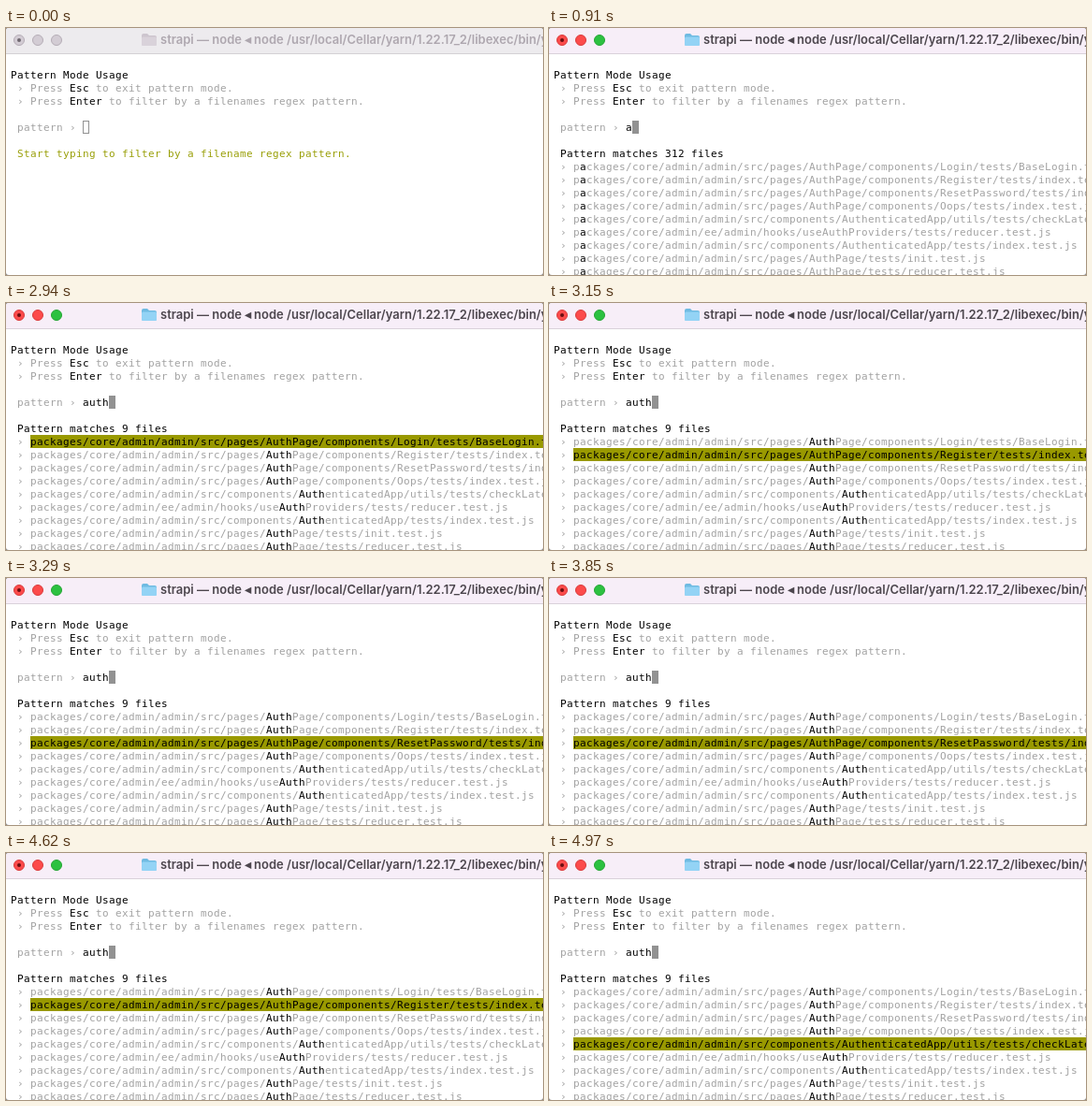
These frames come from a looping animation (574 by 264 pixels, 5530 ms). An HTML page:

```html
<!DOCTYPE html>
<html lang="en">
<head>
<meta charset="utf-8">
<title>Pattern mode</title>
<style>
  html, body { margin: 0; width: 100%; height: 100%; overflow: hidden; background: #fff; }
  svg { display: block; }
  text { white-space: pre; }
  .mono { font: 11px "DejaVu Sans Mono", monospace; }
  .title { font: 600 13px Inter, sans-serif; }
</style>
</head>
<body>
<svg id="stage" width="574" height="264" viewBox="0 0 574 264"></svg>
<script>
const LOOP = 5530, CELL = 7, LINE = 14, LEFT = 5, BASE = 54;
const INK = '#000', DIM = '#a2a2a2', OLIVE = '#999f08';
const PAGES = 'packages/core/admin/admin/src/pages/AuthPage/';
const PARTS = 'packages/core/admin/admin/src/components/AuthenticatedApp/';
const FILES = [
  PAGES + 'components/Login/tests/BaseLogin.test.js',
  PAGES + 'components/Register/tests/index.test.js',
  PAGES + 'components/ResetPassword/tests/index.test.js',
  PAGES + 'components/Oops/tests/index.test.js',
  PARTS + 'utils/tests/checkLatestStrapiVersion.test.js',
  'packages/core/admin/ee/admin/hooks/useAuthProviders/tests/reducer.test.js',
  PARTS + 'tests/index.test.js',
  PAGES + 'tests/init.test.js',
  PAGES + 'tests/reducer.test.js'
];

// [start time, value]
const TYPED = [[0, ''], [910, 'a'], [1190, 'au'], [1260, 'aut'], [1470, 'auth']];
const PICKED = [
  [0, -1], [2940, 0], [3080, 1], [3220, 2], [3360, 3],
  [3640, 2], [3920, 1], [4060, 0], [4200, -1],
  [4410, 0], [4550, 1], [4690, 2], [4830, 3], [4970, 4]
];
const FOCUS = 490;

const stage = document.getElementById('stage');
const at = (track, t) => track.filter(([start]) => start <= t).pop()[1];

function add(parent, tag, attrs, text) {
  const el = document.createElementNS('http://www.w3.org/2000/svg', tag);
  for (const key in attrs) el.setAttribute(key, attrs[key]);
  if (text) el.textContent = text;
  return parent.appendChild(el);
}

// Places text on the terminal's character grid.
function put(parent, row, col, text, fill, extra) {
  const x = [...text].map((_, i) => LEFT + (col + i) * CELL).join(' ');
  add(parent, 'text', { class: 'mono', x, y: BASE + row * LINE, fill, ...extra }, text);
}

function drawBar(g, active) {
  add(g, 'rect', { width: 574, height: 27, fill: active ? '#f7eef8' : '#edebee' });
  add(g, 'rect', { y: 27, width: 574, height: 1, fill: active ? '#d9d1da' : '#d4d1d5' });
  const lights = active
    ? [['#fc4b4b', '#d93a3c'], ['#fc4b4b', '#d93a3c'], ['#2cc140', '#24a534']]
    : Array(3).fill(['#d3ccd4', '#b5adb6']);
  lights.forEach(([fill, stroke], i) =>
    add(g, 'circle', { cx: 14 + 20 * i, cy: 13, r: 5.5, fill, stroke }));
  add(g, 'circle', { cx: 14, cy: 13, r: 2, fill: active ? '#6b0d10' : '#6f6870' });

  const [back, front] = active ? ['#6fbbe2', '#93d3f5'] : ['#cdc5ce', '#d9d2da'];
  add(g, 'path', { d: 'M145 8q0-2 2-2h4l2 2h6q2 0 2 2v7q0 2-2 2h-12q-2 0-2-2z', fill: back });
  add(g, 'rect', { x: 145, y: 9.5, width: 16, height: 9.5, rx: 1.5, fill: front });
  add(g, 'text', { class: 'title', x: 165, y: 17, fill: active ? '#4c464d' : '#aea7af' },
    'strapi — node ◂ node /usr/local/Cellar/yarn/1.22.17_2/libexec/bin/yarn.js');
}

function drawFile(g, file, i, typed, picked) {
  const row = 7 + i;
  put(g, row, 1, '›', DIM);
  if (picked) {
    add(g, 'rect', { x: 26, y: 141 + i * LINE, width: 548, height: LINE, fill: '#999900' });
    put(g, row, 3, file, INK);
    return;
  }
  const from = file.toLowerCase().indexOf(typed), to = from + typed.length;
  put(g, row, 3, file.slice(0, from), DIM);
  put(g, row, 3 + from, file.slice(from, to), INK);
  put(g, row, 3 + to, file.slice(to), DIM);
}

function draw(active, typed, picked) {
  stage.replaceChildren();
  add(stage, 'rect', { width: 574, height: 264, fill: '#8a8a8a' });
  const clip = add(stage, 'clipPath', { id: 'win' });
  add(clip, 'rect', { width: 574, height: 264, rx: 3 });
  const g = add(stage, 'g', { 'clip-path': 'url(#win)' });
  add(g, 'rect', { width: 574, height: 264, fill: '#fff' });
  drawBar(g, active);

  put(g, 0, 0, 'Pattern Mode Usage', INK, { 'font-weight': 700 });
  [['Esc', 'to exit pattern mode.'], ['Enter', 'to filter by a filenames regex pattern.']]
    .forEach(([key, rest], i) => {
      put(g, 1 + i, 1, '› Press', DIM);
      put(g, 1 + i, 9, key, INK);
      put(g, 1 + i, 10 + key.length, rest, DIM);
    });

  put(g, 4, 1, 'pattern ›', DIM);
  put(g, 4, 11, typed, INK);
  const x = LEFT + (11 + typed.length) * CELL;
  add(g, 'rect', active
    ? { x, y: 99, width: CELL, height: LINE, fill: '#929292' }
    : { x: x + .5, y: 99.5, width: CELL - 1, height: LINE - 1, fill: 'none', stroke: '#929292' });

  if (!typed) {
    put(g, 6, 1, 'Start typing to filter by a filename regex pattern.', OLIVE, { 'font-style': 'italic' });
    return;
  }
  put(g, 6, 1, `Pattern matches ${typed === 'a' ? 312 : FILES.length} files`, INK);
  FILES.forEach((file, i) => drawFile(g, file, i, typed, i === picked));
}

let shown = '';
function tick() {
  const t = performance.now() % LOOP;
  const state = [t >= FOCUS, at(TYPED, t), at(PICKED, t)];
  if (String(state) !== shown) {
    shown = String(state);
    draw(...state);
  }
  requestAnimationFrame(tick);
}
tick();
</script>
</body>
</html>
```
